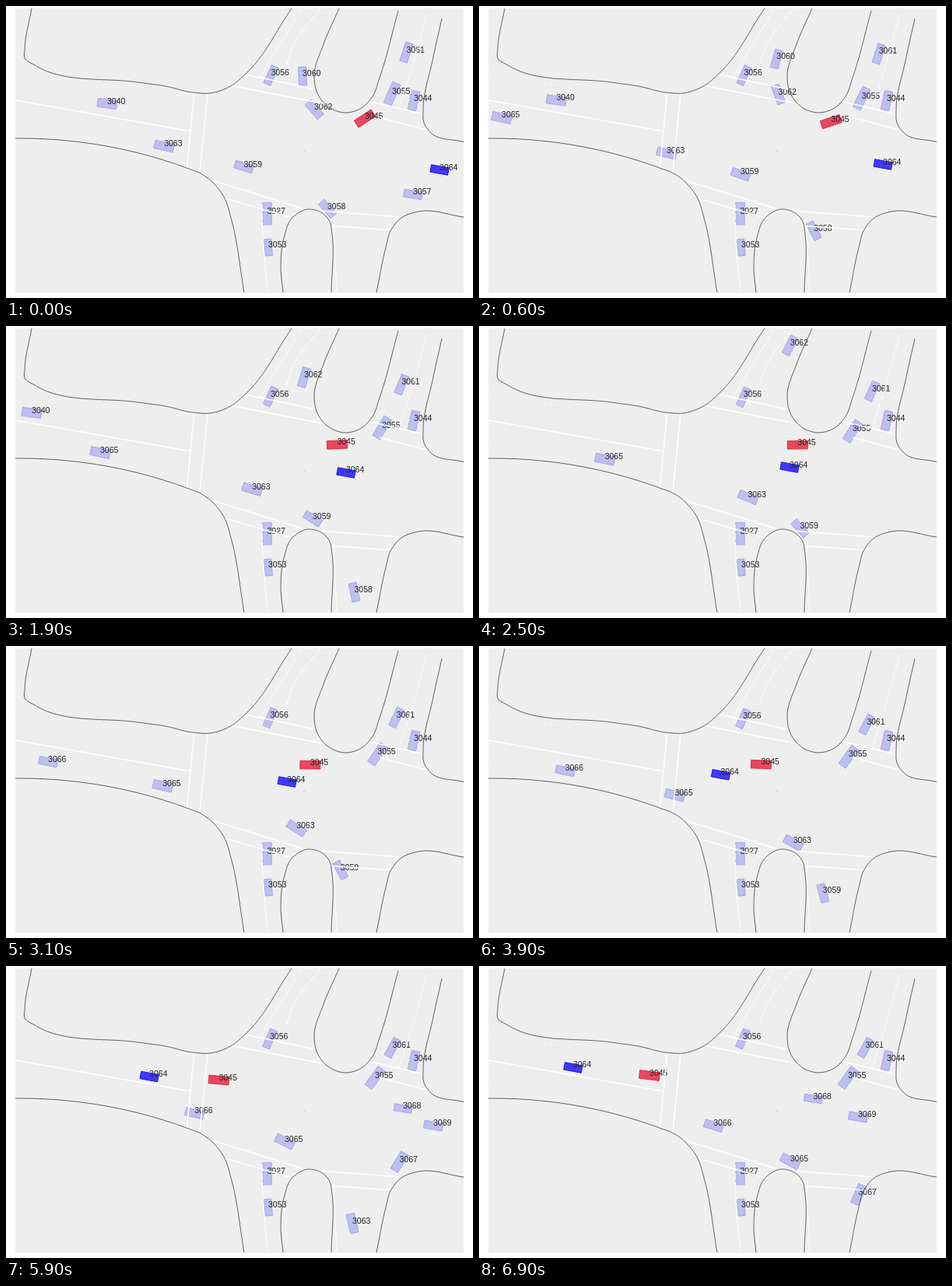
Write an HTML page with a canvas that moves like this. It is 600x375 px and loops after 7000 ms.

```html
<!DOCTYPE html>
<html lang="en">
<head>
<meta charset="utf-8">
<title>Intersection traffic</title>
<style>
  html, body { margin: 0; width: 100%; height: 100%; overflow: hidden; background: #fff; }
  canvas { display: block; width: 600px; height: 375px; }
</style>
</head>
<body>
<canvas id="stage" width="600" height="375"></canvas>
<script>
const LOOP = 7000, STEP = 100;
const ctx = document.getElementById('stage').getContext('2d');

const PALE = { fill: '#bebef0', edge: '#a5a5e6' };
const BLUE = { fill: '#4038fc', edge: '#1a14e0' };
const RED = { fill: '#e8485e', edge: '#d8283f' };

// Smooth curve through knots [u, x, y]; yields [x, y] at u, or null outside.
function spline(knots) {
  const rate = (i, k) => (knots[i + 1][k] - knots[i][k]) / (knots[i + 1][0] - knots[i][0]);
  const slope = (i, k) => {
    if (i === 0) return rate(0, k);
    if (i === knots.length - 1) return rate(i - 1, k);
    const before = knots[i][0] - knots[i - 1][0], after = knots[i + 1][0] - knots[i][0];
    return (rate(i - 1, k) * after + rate(i, k) * before) / (before + after);
  };
  return u => {
    const i = knots.findIndex((knot, j) => j < knots.length - 1 && u >= knot[0] && u <= knots[j + 1][0]);
    if (i < 0) return null;
    const a = knots[i], b = knots[i + 1], span = b[0] - a[0], f = (u - a[0]) / span;
    return [1, 2].map(k =>
      a[k] * (1 + 2 * f) * (1 - f) ** 2 + b[k] * f * f * (3 - 2 * f) +
      span * f * (1 - f) * ((1 - f) * slope(i, k) - f * slope(i + 1, k)));
  };
}

// Motions: each returns a function of time giving [x, y, heading in radians] or null.
const rad = degrees => degrees * Math.PI / 180;
const smooth = u => u * u * (3 - 2 * u);
const settle = u => Math.sin(u * Math.PI / 2);

const parked = (x, y, heading) => () => [x, y, rad(heading)];

function creep(from, to, ease) {
  return t => {
    const f = ease(Math.min(t / 4800, 1));
    const [x, y, heading] = from.map((v, k) => v + (to[k] - v) * f);
    return [x, y, rad(heading)];
  };
}

// Constant speed on a straight lane that passes (x0, y0) at time t0.
function cruise(t0, x0, y0, speed, slope) {
  return t => {
    const dx = speed * (t - t0), x = x0 + dx;
    return x < 22 || x > 562 ? null : [x, y0 + slope * dx, Math.atan(slope)];
  };
}

function follow(route, head) {
  return t => {
    const p = route(t + head);
    if (!p) return null;
    const a = route(t + head - 20) || p, b = route(t + head + 20) || p;
    return [...p, Math.atan2(b[1] - a[1], b[0] - a[0])];
  };
}

// Pulls away while swinging from the side road onto a gently arched lane.
function pullOut(t) {
  const x = 461 - 0.0125 * t - 3.27e-6 * t * t;
  const bend = 7.4 * Math.exp((x - 461) / 12), arch = 3.37e-4 * (x - 410);
  return [x, 153.3 - arch * (x - 410) - bend, Math.atan(-2 * arch - bend / 12)];
}

const southTurn = spline([[0, 22, 142.5], [1400, 121, 163], [3230, 241, 189.5], [4300, 304, 206.5],
  [5400, 358, 226], [6230, 394, 248], [6850, 413, 261], [7400, 429, 287], [8530, 445, 331], [8800, 448, 345]]);
const northExit = spline([[-400, 408, 144], [0, 396, 133.5], [600, 384.5, 114], [1250, 381, 91],
  [1900, 383, 66.5], [2400, 397, 31], [2700, 405, 16]]);
const southExit = spline([[4100, 563, 217], [4800, 532.5, 226.5], [5900, 505.5, 252], [6900, 487.5, 294]]);

const cars = [];
const car = (id, length, width, motion, paint = PALE) => cars.push({ id, length, width, motion, paint });

car(3027, 28.5, 11.5, parked(335.5, 267, 90));
car(3053, 21.5, 9, parked(337, 310.5, 85));
car(3044, 25, 10.5, parked(524, 122, -78));
car(3056, 25, 9.5, creep([340.5, 89.5, -65], [339, 94, -66], smooth));
car(3061, 25.5, 10, creep([514.5, 60, -72], [496.5, 105.5, -61], smooth));
car(3055, 29, 11, creep([496, 113, -66], [474, 144, -54], settle));
car(3040, 25, 11, cruise(0, 130, 126, -0.051, 0.144));
car(3057, 23.5, 10, cruise(0, 523, 242.5, 0.066, 0.165));
car(3068, 23, 9, cruise(5900, 510, 183.5, -0.0805, 0.155));
car(3069, 24, 10, cruise(5900, 549, 205.5, -0.062, 0.177));
car(3058, 24, 10, follow(southTurn, 6850));
car(3059, 24, 10, follow(southTurn, 4330));
car(3063, 25, 10.5, follow(southTurn, 2630));
car(3065, 25, 11, follow(southTurn, -500));
car(3066, 24, 10, follow(southTurn, -2650));
car(3062, 25, 10.5, follow(northExit, 0));
car(3060, 24, 10, follow(northExit, 1260));
car(3067, 26, 11, follow(southExit, 0));
car(3045, 26, 10.5, pullOut, RED);
car(3064, 23, 9.5, cruise(0, 557, 211, -0.0632, 0.1835), BLUE);

function line(color, width, dash, [x, y, ...rest]) {
  ctx.strokeStyle = color;
  ctx.lineWidth = width;
  ctx.setLineDash(dash);
  ctx.beginPath();
  ctx.moveTo(x, y);
  for (let i = 0; i < rest.length; i += 2) ctx.lineTo(rest[i], rest[i + 1]);
  ctx.stroke();
}

// Edge of the road: a spline through the points, spaced by chord length.
function curb(...p) {
  const knots = [[0, p[0], p[1]]];
  for (let i = 2; i < p.length; i += 2) {
    const run = Math.hypot(p[i] - p[i - 2], p[i + 1] - p[i - 1]);
    knots.push([knots[knots.length - 1][0] + run, p[i], p[i + 1]]);
  }
  const curve = spline(knots), end = knots[knots.length - 1][0], path = [];
  for (let u = 0; u < end; u += 3) path.push(...curve(u));
  return [...path, ...curve(end)];
}

const curbs = [
  curb(33, 3, 24, 55, 24, 67, 37, 76, 170, 98, 205, 103, 240, 111, 262, 112, 290, 102, 309, 86, 367, 3),
  curb(428, 3, 408, 49, 396, 90, 400, 112, 415, 130, 435, 137, 455, 132, 471, 116, 480, 92, 504, 6),
  curb(560, 16, 548, 70, 536, 133, 537, 150, 546, 163, 588, 174.5),
  curb(12, 170, 24, 170, 232, 208, 250, 215, 268, 229, 281, 247, 289, 272, 306, 368),
  curb(356, 368, 353, 336, 357, 298, 367, 273, 388, 261, 405, 265, 416, 277, 418.5, 290, 418, 368),
  curb(476, 368, 488, 310, 494, 289, 508, 272, 530, 264, 588, 271),
];

const marking = (...p) => line('#fff', 1.5, [], p);
const lane = (...p) => line('#fff', 1, [9, 2], p);
const faint = (...p) => line('rgba(255,255,255,.6)', 0.9, [3, 5], p);

function drawMap() {
  faint(12, 87, 240, 125);
  faint(12, 150, 234, 195);
  faint(470, 202, 588, 222);
  lane(380, 4, 350, 52, 327, 91);
  lane(403, 4, 381, 31, 368, 53, 360, 76);
  lane(540, 12, 521, 82, 505, 131);
  lane(329, 255, 330, 305, 336, 368);
  lane(421, 284, 425, 368);

  marking(12, 121, 238, 161);
  marking(241.5, 113, 232.5, 208);
  marking(259, 113, 249, 213);
  marking(308, 88, 397, 107);
  marking(288, 102, 411, 126);
  marking(468, 123, 537, 139);
  marking(480, 143, 539, 159);
  marking(262, 223, 381, 260);
  marking(281, 247, 371, 273);
  marking(402, 263, 509, 271);
  marking(419, 282.5, 498, 288);

  curbs.forEach(path => line('#3a3a3a', 0.8, [], path));
  ctx.fillStyle = '#aaa';
  ctx.fillRect(382.5, 185.5, 1.2, 1.2);
}

function drawCar({ length, width, paint }, [x, y, heading]) {
  ctx.save();
  ctx.translate(x, y);
  ctx.rotate(heading);
  ctx.fillStyle = paint.fill;
  ctx.strokeStyle = paint.edge;
  ctx.lineWidth = 0.9;
  ctx.setLineDash([]);
  ctx.beginPath();
  ctx.rect(-length / 2, -width / 2, length, width);
  ctx.fill();
  ctx.stroke();
  ctx.restore();
}

function draw(t) {
  ctx.fillStyle = '#fff';
  ctx.fillRect(0, 0, 600, 375);
  ctx.save();
  ctx.beginPath();
  ctx.rect(12, 3, 576, 365.5);
  ctx.clip();
  ctx.fillStyle = '#eee';
  ctx.fillRect(12, 3, 576, 366);

  const visible = cars.map(c => [c, c.motion(t)]).filter(([, pose]) => pose);
  ctx.save();
  ctx.translate(0, -0.5);
  visible.forEach(([c, pose]) => drawCar(c, pose));
  ctx.fillStyle = '#222';
  ctx.font = '10.5px "Liberation Sans", Arial, sans-serif';
  visible.forEach(([c, [x, y]]) => ctx.fillText(c.id, x, y));
  ctx.restore();
  drawMap();
  ctx.restore();
}

function tick() {
  const t = performance.now() % LOOP;
  draw(Math.floor(t / STEP) * STEP);
  requestAnimationFrame(tick);
}
tick();
</script>
</body>
</html>
```
